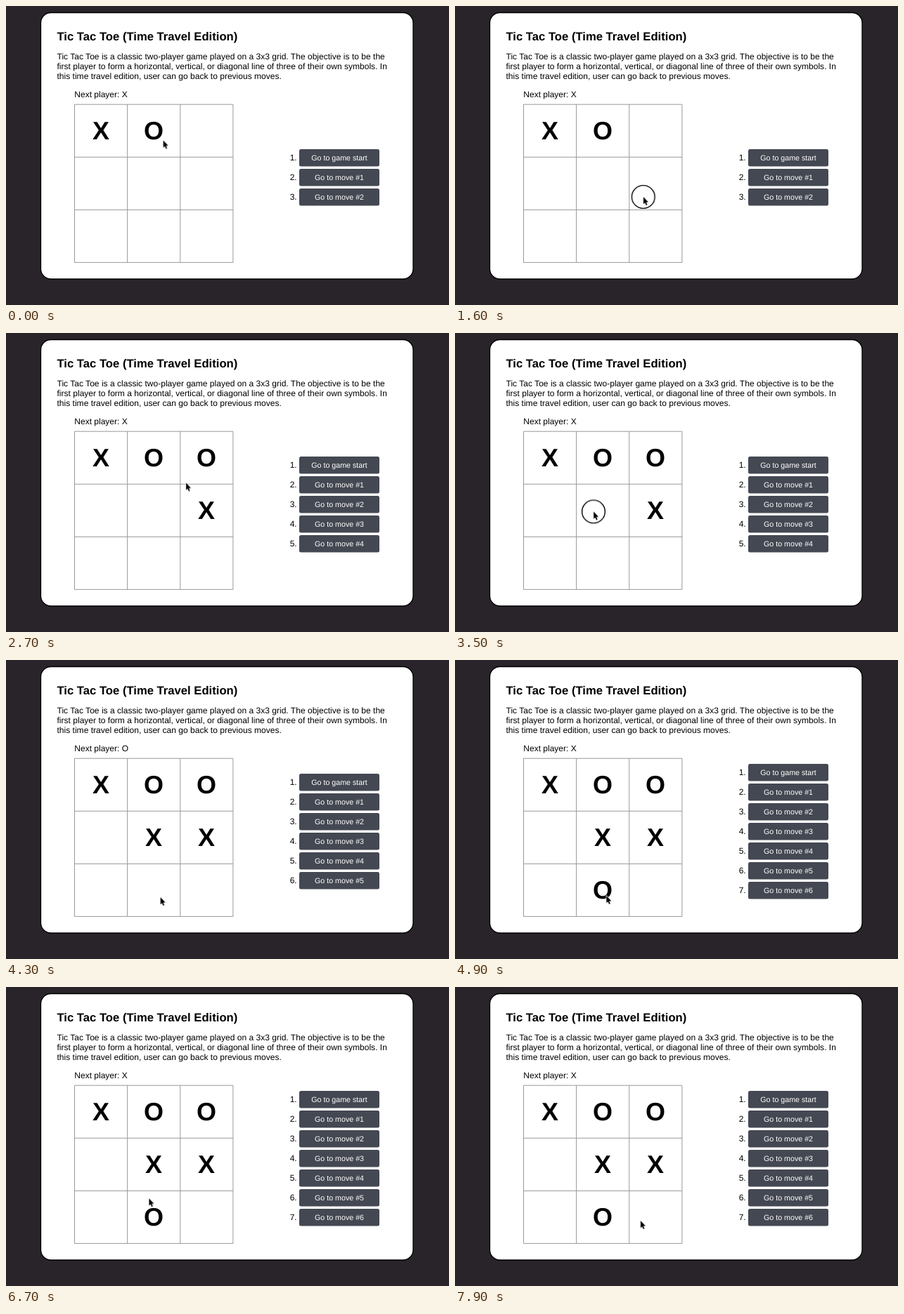
An HTML page that plays this animation: 630x426 px, repeating every 8000 ms.

```html
<!DOCTYPE html>
<html lang="en">
<head>
<meta charset="utf-8">
<title>Tic Tac Toe</title>
<style>
  html, body { margin: 0; width: 100%; height: 100%; overflow: hidden; background: #29242a; }
  svg { display: block; width: 630px; height: 426px; }
  text {
    font: 12px "Liberation Sans", Arial, Helvetica, sans-serif;
    fill: #000;
    text-rendering: geometricPrecision;
  }
  .title { font-size: 16.65px; font-weight: bold; }
  .body text { font-size: 12.06px; }
  .marks text { font-size: 36px; font-weight: bold; text-anchor: middle; }
  .grid { fill: none; stroke: #999; }
  .list .num { text-anchor: end; }
  .list .label { font-size: 10.7px; fill: #fff; text-anchor: middle; }

  /* 1% of the loop is 80 ms; one picture step is 1.25% */
  .list, .m1, .m2, .m3, .m4, .turn-x, .turn-o, .ring, .cursor {
    animation: 8s step-end infinite;
  }
  .m1, .m2, .m3, .m4, .turn-o, .ring { opacity: 0; }
  .m1 { animation-name: move1; }
  .m2 { animation-name: move2; }
  .m3 { animation-name: move3; }
  .m4 { animation-name: move4; }
  .turn-x { animation-name: turn-x; }
  .turn-o { animation-name: turn-o; }
  .list { animation-name: list; }
  .ring { animation-name: ring; }
  .cursor { animation-name: cursor; }

  @keyframes move1 { 0% { opacity: 0 } 21.25%, 100% { opacity: 1 } }
  @keyframes move2 { 0% { opacity: 0 } 31.25%, 100% { opacity: 1 } }
  @keyframes move3 { 0% { opacity: 0 } 45%, 100% { opacity: 1 } }
  @keyframes move4 { 0% { opacity: 0 } 60%, 100% { opacity: 1 } }
  @keyframes turn-x {
    0%, 31.25%, 60%, 100% { opacity: 1 }
    21.25%, 45% { opacity: 0 }
  }
  @keyframes turn-o {
    0%, 31.25%, 60%, 100% { opacity: 0 }
    21.25%, 45% { opacity: 1 }
  }
  @keyframes list {
    0% { transform: translateY(0) }
    21.25% { transform: translateY(-14px) }
    31.25% { transform: translateY(-28px) }
    45% { transform: translateY(-42px) }
    60%, 100% { transform: translateY(-56px) }
  }
  @keyframes ring {
    0%, 21.25%, 31.25%, 45%, 60%, 100% { opacity: 0 }
    20%, 30%, 43.75%, 58.75% { opacity: 1 }
  }
  @keyframes cursor {
    0% { transform: translate(223.5px, 191.5px); animation-timing-function: steps(7) }
    8.75% { transform: translate(243px, 305px) }
    10% { transform: translate(262px, 308px) }
    11.25% { transform: translate(265px, 277px) }
    12.5%, 15% { transform: translate(265.5px, 276px); animation-timing-function: steps(2) }
    17.5%, 21.25% { transform: translate(267.7px, 272px); animation-timing-function: steps(5) }
    27.5%, 31.25% { transform: translate(275px, 192.5px); animation-timing-function: steps(7) }
    40% { transform: translate(208px, 266px) }
    41.25%, 45% { transform: translate(197px, 254.5px); animation-timing-function: steps(5) }
    51.25%, 52.5% { transform: translate(219.8px, 339.5px) }
    53.75%, 60% { transform: translate(219.5px, 338px); animation-timing-function: steps(9) }
    71.25% { transform: translate(180.2px, 319px); animation-timing-function: steps(6) }
    78.75%, 80% { transform: translate(153.5px, 263px); animation-timing-function: steps(6) }
    87.5%, 88.75% { transform: translate(253px, 339.5px); animation-timing-function: steps(4) }
    93.75%, 96.25% { transform: translate(260.5px, 336px); animation-timing-function: steps(2) }
    98.75%, 100% { transform: translate(263.7px, 333px) }
  }
</style>
</head>
<body>
<svg viewBox="0 0 630 426">
  <rect x="49.5" y="9.5" width="529.5" height="379.5" rx="14.5" fill="#fff" stroke="#000" stroke-width="1.3"/>

  <text class="title" x="72.5" y="48.8">Tic Tac Toe (Time Travel Edition)</text>
  <g class="body">
    <text x="72.5" y="76">Tic Tac Toe is a classic two-player game played on a 3x3 grid. The objective is to be the</text>
    <text x="72.5" y="90">first player to form a horizontal, vertical, or diagonal line of three of their own symbols. In</text>
    <text x="72.5" y="104">this time travel edition, user can go back to previous moves.</text>
  </g>

  <text class="turn-x" x="97.3" y="130">Next player: X</text>
  <text class="turn-o" x="97.3" y="130">Next player: O</text>

  <path class="grid" d="M97.5 140.2h225.4v225.2h-225.4zM172.6 140.2v225.2M247.8 140.2v225.2M97.5 215.3h225.4M97.5 290.4h225.4"/>
  <g class="marks">
    <text x="135" y="190.2">X</text>
    <text x="210" y="190.2">O</text>
    <text class="m1" x="285" y="265.2">X</text>
    <text class="m2" x="285" y="190.2">O</text>
    <text class="m3" x="210" y="265.2">X</text>
    <text class="m4" x="210" y="340.2">O</text>
  </g>

  <defs><rect id="btn" x="417" y="204" width="114" height="24.5" rx="2.5" fill="#444852"/></defs>
  <g class="list">
    <g>
      <text class="num" x="413.7" y="220">1.</text><use href="#btn"/>
      <text class="label" x="474" y="220">Go to game start</text>
    </g>
    <g transform="translate(0 28)">
      <text class="num" x="413.7" y="220">2.</text><use href="#btn"/>
      <text class="label" x="474" y="220">Go to move #1</text>
    </g>
    <g transform="translate(0 56)">
      <text class="num" x="413.7" y="220">3.</text><use href="#btn"/>
      <text class="label" x="474" y="220">Go to move #2</text>
    </g>
    <g class="m1"><g transform="translate(0 84)">
      <text class="num" x="413.7" y="220">4.</text><use href="#btn"/>
      <text class="label" x="474" y="220">Go to move #3</text>
    </g></g>
    <g class="m2"><g transform="translate(0 112)">
      <text class="num" x="413.7" y="220">5.</text><use href="#btn"/>
      <text class="label" x="474" y="220">Go to move #4</text>
    </g></g>
    <g class="m3"><g transform="translate(0 140)">
      <text class="num" x="413.7" y="220">6.</text><use href="#btn"/>
      <text class="label" x="474" y="220">Go to move #5</text>
    </g></g>
    <g class="m4"><g transform="translate(0 168)">
      <text class="num" x="413.7" y="220">7.</text><use href="#btn"/>
      <text class="label" x="474" y="220">Go to move #6</text>
    </g></g>
  </g>

  <g class="cursor">
    <circle class="ring" r="16.4" fill="none" stroke="#000" stroke-width="1.4"/>
    <path d="M.2 0V10.2L2.4 8.2L4 12L5.7 11.2L4.1 7.5H7.2Z" stroke="#fff" stroke-width="1.4" paint-order="stroke" stroke-linejoin="round"/>
  </g>
</svg>
</body>
</html>
```
